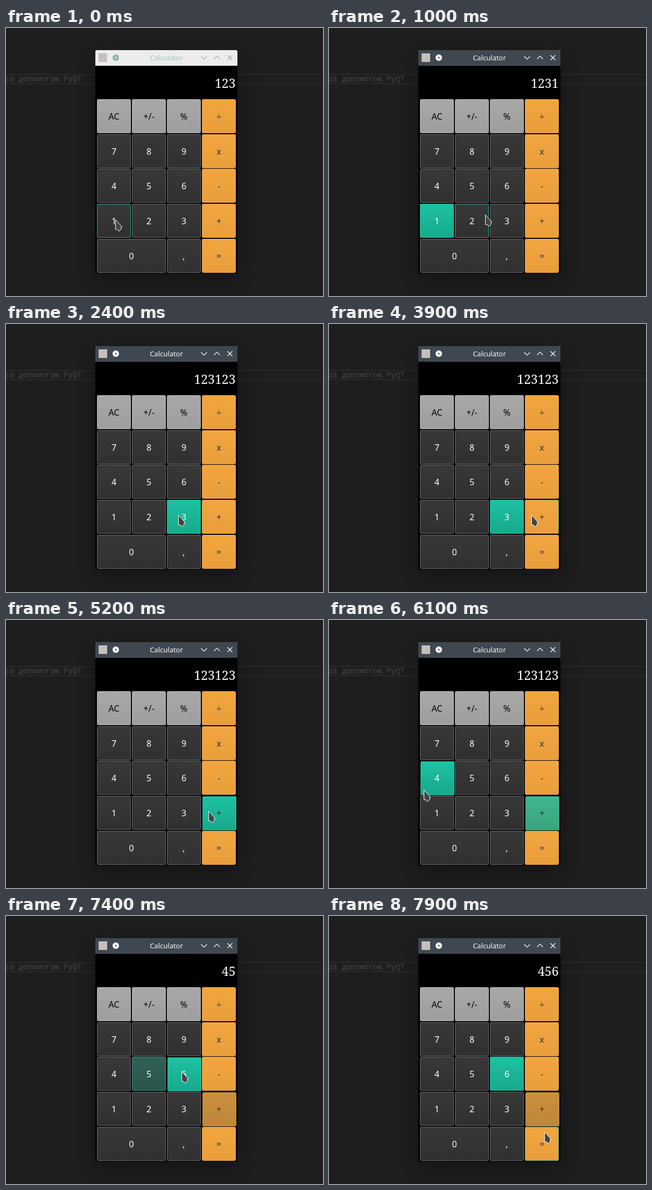
Write an HTML page with a canvas that moves like this. It is 589 by 497 pixels and loops after 8 s.

```html
<!DOCTYPE html>
<html lang="uk">
<head>
<meta charset="utf-8">
<title>Calculator</title>
<style>
html, body { margin: 0; width: 100%; height: 100%; overflow: hidden; background: #1e1e1e; }
canvas { display: block; }
</style>
</head>
<body>
<canvas id="stage" width="589" height="497"></canvas>
<script>
const ctx = document.getElementById('stage').getContext('2d');
const LOOP = 8000, STEP = 100;
const TEAL = ['#1dc2a2', '#18a98b'];
const SKINS = {
  gray: { fill: ['#a9a9a9', '#9d9d9d'], edge: '#b4b4b4', text: '#000' },
  dark: { fill: ['#383838', '#303030'], edge: '#6b6b6b', text: '#fff' },
  orange: { fill: ['#f2a640', '#e89e3b'], edge: '#f0a843', text: '#2b3036' },
  held: { fill: ['#ca903f', '#c08638'], edge: '#d0963f', text: '#33302c' }
};

const rowTops = [132, 197, 261, 326, 391];
const rows = [['AC', '+/-', '%', '÷'], ['7', '8', '9', 'x'], ['4', '5', '6', '-'], ['1', '2', '3', '+'], ['0', '', ',', '=']];
const buttons = rows.flatMap((row, r) => row.map((label, c) => ({
  label, x: 169 + 65 * c, y: rowTops[r], w: label === '0' ? 128 : 63, h: 63,
  skin: c === 3 ? 'orange' : r === 0 ? 'gray' : 'dark'
}))).filter(b => b.label);

// press time, release time, label, display after release, first glow of the button losing focus
const presses = [
  [500, 600, '1', '1231', 0],
  [1200, 1300, '2', '12312', .8],
  [2200, 2300, '3', '123123', .8],
  [5100, LOOP, '+', '123123', .3],
  [6100, 6300, '4', '4', .8],
  [6800, 6900, '5', '45', .3],
  [7400, 7500, '6', '456', .3]
];

// pointer: start time, end time, x, y at the end
const moves = [
  [0, 1, 203, 356],
  [700, 1000, 290, 347],
  [1700, 2000, 320, 355],
  [2900, 3300, 195, 245],
  [3400, 3900, 376, 355],
  [5500, 5900, 176, 316],
  [6300, 6600, 266, 295],
  [6900, 7200, 326, 289],
  [7600, 7900, 400, 401]
];

function pointerAt(t) {
  let [, , x, y] = moves[0];
  for (const [start, end, tx, ty] of moves) {
    const p = Math.min(1, Math.max(0, (t - start) / (end - start)));
    const e = p * p * (3 - 2 * p);
    x += (tx - x) * e;
    y += (ty - y) * e;
  }
  return { x: Math.round(x), y: Math.round(y) };
}

const inside = (b, p) => p.x >= b.x && p.x < b.x + b.w && p.y >= b.y && p.y < b.y + b.h;

function glowOf(label, t) {
  const i = presses.findLastIndex(p => p[0] <= t);
  if (i < 0) return 0;
  if (presses[i][2] === label) return 1;
  if (i === 0 || presses[i - 1][2] !== label) return 0;
  return Math.max(0, presses[i][4] - (t - presses[i][0]) / STEP * .5);
}

function text(str, x, y, font, color, align = 'center') {
  ctx.font = font;
  ctx.fillStyle = color;
  ctx.textAlign = align;
  ctx.fillText(str, x, y);
}

function line(color, width, ...points) {
  ctx.beginPath();
  points.forEach(([x, y]) => ctx.lineTo(x, y));
  ctx.strokeStyle = color;
  ctx.lineWidth = width;
  ctx.stroke();
}

function disc(x, y, r, color) {
  ctx.beginPath();
  ctx.arc(x, y, r, 0, 7);
  ctx.fillStyle = color;
  ctx.fill();
}

function panel(x, y, w, h, [top, bottom], edge) {
  const g = ctx.createLinearGradient(0, y, 0, y + h);
  g.addColorStop(0, top);
  g.addColorStop(1, bottom);
  ctx.beginPath();
  ctx.roundRect(x + .5, y + .5, w - 1, h - 1, 2);
  ctx.fillStyle = g;
  ctx.fill();
  ctx.strokeStyle = edge;
  ctx.lineWidth = 1;
  ctx.stroke();
}

function drawBackdrop() {
  ctx.fillStyle = '#1e1e1e';
  ctx.fillRect(0, 0, 589, 497);
  ctx.fillStyle = '#292929';
  ctx.fillRect(0, 85, 589, 2);
  ctx.fillRect(0, 102, 589, 2);
  text('за допомогою PyQT', -2, 99, '14px "Noto Sans Mono", monospace', '#484848', 'left');
  ctx.save();
  ctx.shadowColor = 'rgba(0,0,0,.4)';
  ctx.shadowBlur = 44;
  ctx.shadowOffsetY = 12;
  ctx.fillStyle = '#000';
  ctx.fillRect(166, 45, 264, 410);
  ctx.restore();
}

function drawTitle(active) {
  const ink = active ? '#fcfcfc' : '#8fb3b3';
  const bar = active ? '#3f4850' : '#ececec';
  ctx.beginPath();
  ctx.roundRect(166, 41, 264, 29, [3, 3, 0, 0]);
  ctx.fillStyle = bar;
  ctx.fill();
  ctx.fillStyle = '#c4c0bb';
  ctx.fillRect(172, 47, 16, 16);
  disc(204, 55, 6, ink);
  disc(204, 55, 1.6, bar);
  text('Calculator', 298, 60, '13px "Noto Sans", sans-serif', active ? '#fcfcfc' : '#a0c0c0');
  line(ink, 1.2, [362.5, 52.5], [368, 58], [373.5, 52.5]);
  line(ink, 1.2, [386.5, 57.5], [392, 52], [397.5, 57.5]);
  line(ink, 1.2, [411.5, 50.5], [420.5, 59.5]);
  line(ink, 1.2, [420.5, 50.5], [411.5, 59.5]);
}

function drawButton(b, t, pointer, before) {
  const held = presses.some(([down, up, label]) => label === b.label && t >= down && t < up);
  const skin = SKINS[held && b.label === '+' ? 'held' : b.skin];
  const shift = held ? 1 : 0;
  const box = [b.x + shift, b.y + shift, b.w, b.h];
  panel(...box, skin.fill, skin.edge);
  if (inside(b, pointer)) {
    ctx.globalAlpha = inside(b, before) ? 1 : .6;
    panel(...box, skin.fill, '#1abc9c');
  }
  ctx.globalAlpha = glowOf(b.label, t);
  panel(...box, TEAL, '#1fbfa0');
  ctx.globalAlpha = 1;
  text(b.label, b.x + b.w / 2, b.y + 38, '16px "Noto Sans", sans-serif', skin.text);
}

function drawPointer({ x, y }) {
  ctx.save();
  ctx.translate(x + .5, y + .5);
  const arrow = new Path2D('M0 -1V17H3.5L6.5 20.5L10.5 16.5V12.5H12.3Z');
  ctx.fillStyle = '#444';
  ctx.fill(arrow);
  ctx.strokeStyle = '#fff';
  ctx.lineWidth = 1;
  ctx.lineJoin = 'round';
  ctx.stroke(arrow);
  ctx.restore();
}

function draw(t) {
  const pointer = pointerAt(t), before = pointerAt(t - STEP);
  drawBackdrop();
  drawTitle(false);
  if (t >= 500) {
    ctx.globalAlpha = t < 600 ? .5 : 1;
    drawTitle(true);
    ctx.globalAlpha = 1;
  }
  ctx.fillStyle = '#000';
  ctx.fillRect(166, 70, 264, 385);
  const entry = presses.findLast(p => p[1] <= t);
  text(entry ? entry[3] : '123', 426.5, 111, '23px "Noto Serif", serif', '#fff', 'right');
  buttons.forEach(b => drawButton(b, t, pointer, before));
  drawPointer(pointer);
}

const origin = performance.now();
function tick() {
  const t = (performance.now() - origin) % LOOP;
  draw(Math.floor(t / STEP) * STEP);
  requestAnimationFrame(tick);
}
tick();
</script>
</body>
</html>
```
